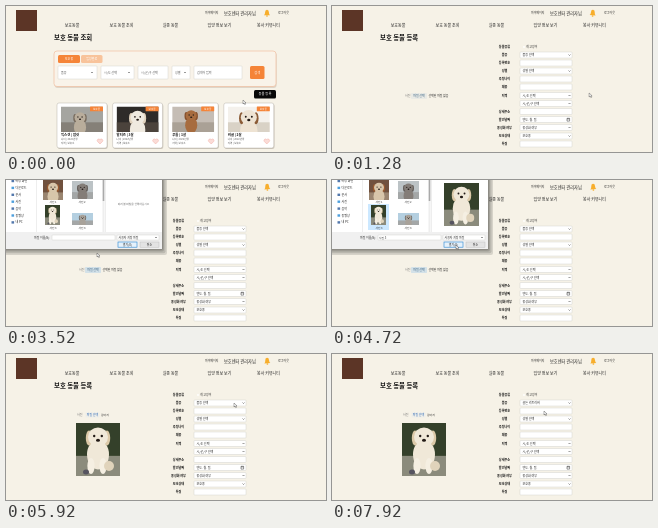
Animation of 320x146 px, one loop 8 s. Source, as an HTML page:

```html
<!DOCTYPE html>
<html>
<head>
<meta charset="utf-8">
<title>보호 동물 등록</title>
<style>
html, body { margin: 0; width: 100%; height: 100%; overflow: hidden; background: #f6f2e7; }
svg { display: block; }
#stage { width: 100%; height: 100%; }
text { font-family: "Noto Sans CJK KR", "Noto Sans CJK", "Noto Sans", sans-serif; }
</style>
</head>
<body>
<svg id="stage" viewBox="0 0 320 146"></svg>
<script>
const LOOP = 8000;
const ORANGE = '#f58438';
const $ = id => document.getElementById(id);

// Text is placed by its vertical centre.
const text = (x, y, s, size = 3, fill = '#222', more = '') =>
  `<text x="${x}" y="${y + size * .36}" font-size="${size}" fill="${fill}" ${more}>${s}</text>`;
const mid = (x, y, s, size, fill, more = '') =>
  text(x, y, s, size, fill, 'text-anchor="middle" ' + more);
const BOLD = 'font-weight="700"';
const rect = (x, y, w, h, fill, more = '') =>
  `<rect x="${x}" y="${y}" width="${w}" height="${h}" fill="${fill}" ${more}/>`;
const oval = (x, y, rx, ry, fill) =>
  `<ellipse cx="${x}" cy="${y}" rx="${rx}" ry="${ry}" fill="${fill}"/>`;
const line = (d, color = '#555', w = .5) =>
  `<path d="${d}" fill="none" stroke="${color}" stroke-width="${w}"/>`;
const group = (id, body) => `<g id="${id}">${body}</g>`;
const field = (x, y, w, h = 6) => rect(x, y - h / 2, w, h, '#fff', 'rx=".7" stroke="#c9c9c4" stroke-width=".4"');
const arrow = (x, y) => line(`M${x - 1} ${y - .5}l1 1 1-1`, '#333');

function pet(x, y, w, h, { vw = w, vh = h, sky, floor, fur, ear, cx = vw / 2, cy = vh * .38, r = vh * .25, legs = '' }) {
  const ears = [-1, 1].map(s => oval(cx + s * r * .9, cy + r * .1, r * .32, r * .75, ear)).join('');
  const eyes = [-1, 1].map(s => oval(cx + s * r * .38, cy - r * .1, r * .12, r * .13, '#221a16')).join('');
  return `<svg x="${x}" y="${y}" width="${w}" height="${h}" viewBox="0 0 ${vw} ${vh}" preserveAspectRatio="none">` +
    rect(0, 0, vw, vh, sky) + rect(0, vh * .62, vw, vh, floor) +
    oval(cx, cy + r * 1.75, r * 1.1, r * 1.5, fur) + legs + ears +
    oval(cx, cy, r, r * .95, fur) + eyes + oval(cx, cy + r * .32, r * .2, r * .15, '#221a16') + '</svg>';
}

const puppy = (x, y, w, h) => pet(x, y, w, h, {
  vw: 44, vh: 53, sky: '#34402a', floor: '#8b8b7c', fur: '#f0e8d8', ear: '#dcc9a8', cx: 22, cy: 14, r: 10,
  legs: oval(15, 43, 3.6, 8, '#f5efe2') + oval(27, 43, 3.6, 8, '#f5efe2') +
    oval(33, 43, 5, 5, '#e0d3bb') + oval(10, 49, 3, 2.5, '#565460')
});

function header() {
  const nav = [[66, '보호동물'], [115.5, '보호 동물 조회'], [164.5, '실종 동물'], [213.5, '입양 정보 보기'], [262.5, '봉사 커뮤니티']];
  return rect(10, 4, 21, 21, '#5c3526') +
    text(199, 7, '마이페이지', 2.9) + text(218, 7, '보호센터 관리자님', 4.2) + text(272, 7, '로그아웃', 3) +
    group('bell', '<path d="M258 9.3q1.1-1 1.1-3a1.9 2.5 0 0 1 3.8 0q0 2 1.1 3z" fill="#f7ae2c"/>' + oval(261, 10, .9, .8, '#f7ae2c')) +
    nav.map(([x, s]) => mid(x, 20, s, 4, '#222', 'font-weight="500"')).join('');
}

function listPage() {
  const inputs = [[52, 39, '품종', 1], [95, 33, '시/도 선택', 1], [132, 30, '시/군/구 선택', 0], [166, 18, '성별', 1], [188, 48, '검색어 입력', 0]];
  const cards = [
    ['믹스견 | 암컷', { sky: '#a5a5a0', floor: '#858078', fur: '#b9ad9b', ear: '#766a5c', cx: 19, cy: 11, r: 5.5 }],
    ['말티즈 | 3살', { sky: '#2e2b29', floor: '#4b433c', fur: '#efeae0', ear: '#e0d2bd', cx: 21, cy: 11, r: 7 }],
    ['푸들 | 1살', { sky: '#c5bdb5', floor: '#aaa196', fur: '#a76c3f', ear: '#86502c', cx: 19, cy: 9, r: 5.5 }],
    ['비글 | 2살', { sky: '#f4f1ec', floor: '#d9d2c6', fur: '#eee3d3', ear: '#8b5b36', cx: 21, cy: 11, r: 8 }]
  ];
  return text(48, 31.5, '보호 동물 조회', 6.4, '#111', BOLD) +
    rect(48.6, 46, 222, 36, '#ded5c8', 'rx="3"') +
    rect(48, 45, 222, 35.5, '#f9f3e9', 'rx="3" stroke="#f0b795" stroke-width=".6"') +
    rect(52, 49, 22, 8, ORANGE, 'rx="1.5"') + mid(63, 53, '보호중', 3, '#fff') +
    rect(75, 49, 21.5, 8, '#f8c39b', 'rx="1.5"') + mid(85.7, 53, '입양완료', 3, '#fff') +
    inputs.map(([x, w, s, open]) => field(x, 66.5, w, 13) +
      text(x + 3, 66.5, s, 3, '#555') + (open ? arrow(x + w - 5, 66.5) : '')).join('') +
    rect(244, 60, 14.5, 13, ORANGE, 'rx="1.5"') + mid(251.2, 66.5, '검색', 3.2, '#fff') +
    rect(248, 84, 22, 8.5, '#080808', 'rx="1.5"') + mid(259, 88.2, '동물 등록', 3.3, '#fff') +
    cards.map(([name, look], i) => {
      const x = 51 + i * 55.6;
      return rect(x + .7, 98, 50, 45, '#d0c9bd', 'rx="2"') +
        rect(x, 97, 50, 45, '#fff', 'rx="2" stroke="#a9a49b" stroke-width=".4"') +
        pet(x + 4, 100.5, 42, 25.5, look) +
        rect(x + 33, 100.5, 13, 4.8, ORANGE, 'rx=".6"') + mid(x + 39.5, 102.9, '보호중', 2.6, '#fff') +
        text(x + 4, 128.5, name, 3.4, '#111', BOLD) +
        text(x + 4, 133, '나이 | 2022년생', 2.5, '#555') + text(x + 4, 137, '지역 | 보호소', 2.5, '#555') +
        `<path d="M${x + 43} 138l-2.5-2.5a1.5 1.5 0 0 1 2.5-1.9 1.5 1.5 0 0 1 2.5 1.9z" fill="#fbdcd7" stroke="#ec9c94" stroke-width=".4"/>`;
    }).join('');
}

function formPage() {
  // label, value, y, kind: r radio, s select, i input, d date
  const rows = [
    ['동물종류', '', 41, 'r'], ['품종', '', 49, 's'], ['등록번호', '', 57, 'i'], ['성별', '성별 선택', 65, 's'],
    ['추정나이', '', 73, 'i'], ['체중', '', 81, 'i'], ['지역', '시/도 선택', 89.5, 's'], ['', '시/군/구 선택', 97.5, 's'],
    ['상세주소', '', 105.5, 'i'], ['발견날짜', '연도. 월. 일.', 113.5, 'd'], ['중성화 여부', '중성화 여부', 121.5, 's'],
    ['보호상태', '보호중', 130, 's'], ['특징', '', 138, 'i']
  ];
  return text(48, 31.5, '보호 동물 등록', 6.4, '#111', BOLD) +
    rows.map(([label, value, y, kind]) => {
      const name = mid(172.5, y, label, 3.1, '#111', BOLD);
      if (kind == 'r') return name + oval(192, y, .9, .9, '#fff') + text(194, y, '개 고양이', 2.9);
      return name + field(188, y, 52) + text(190.5, y, value, 3) +
        (kind == 's' ? arrow(237.5, y) : '') +
        (kind == 'd' ? line(`M235 ${y - 1.2}h2.6v2.8h-2.6zm0 .6h2.6`, '#222', .45) : '');
    }).join('') +
    group('breed', text(190.5, 49, '품종 선택', 3)) +
    group('picked', text(190.5, 49, '골든 리트리버', 3)) +
    group('empty', text(73, 90, '사진', 3, '#777') +
      rect(79, 87, 16, 6, '#e9eae5', 'id="pick" rx=".7"') + mid(87, 90, '파일 선택', 3, '#345f80') +
      text(96.5, 90, '선택된 파일 없음', 2.9)) +
    group('photo', text(71, 61, '사진', 3, '#777') +
      rect(79.5, 58.5, 14, 5, '#eeeee9', 'rx=".7"') + mid(86.5, 61, '파일 선택', 2.9, '#2663b3') +
      text(95, 61, '강아지', 2.8) + puppy(70, 69, 44, 53));
}

function dialog() {
  const folders = ['바탕 화면', '다운로드', '문서', '사진', '음악', '동영상', '내 PC'];
  const grey = { sky: '#bcc3c6', floor: '#a4a7a7', fur: '#847d78', ear: '#645e5a' };
  return [5, 3.5, 2, 1].map(n => rect(-4, -4, 160 + n, 73 + n * 1.2, '#000', 'rx="2" opacity=".13"')).join('') +
    rect(0, 0, 156, 69, '#f0f0f0') + rect(0, 0, 156, 52, '#fff') +
    folders.map((s, i) => rect(5.5, 1 + i * 6.9 - 1.2, 2.6, 2.4, i % 2 ? '#4d9fdd' : '#5378ac') +
      text(9.5, 1 + i * 6.9, s, 3)).join('') +
    line('M30.5 0V52M99.5 0V52', '#ddd') + rect(96.5, 0, 2, 52, '#eee') + rect(96.7, 0, 1.6, 21, '#aaa') +
    group('mark', rect(36, 24, 21, 26, '#cce8ff')) +
    pet(37, 0, 20, 20, { sky: '#70513e', floor: '#9a8570', fur: '#d8c6aa', ear: '#98592f' }) +
    pet(66, 1, 21, 18, grey) + puppy(39, 25, 15, 20) +
    pet(66, 33, 21, 12, { ...grey, sky: '#b4cfe0', fur: '#a8a29a' }) +
    [[47, 22.3], [76, 22.3], [47, 48], [76, 48]].map(([x, y], i) => mid(x, y, '사진 ' + (i + 1), 2.7)).join('') +
    group('hint', mid(127.5, 24.5, '미리 볼 파일을 선택하십시오', 2.7, '#666')) +
    group('preview', puppy(112, 3, 35, 43)) +
    text(28, 57.5, '파일 이름(N):', 2.9) + field(46, 57.5, 63, 5) + group('file', text(47, 57.5, '사진 3', 2.8)) +
    field(111, 57.5, 42, 5) + text(112.5, 57.5, '사용자 지정 파일', 2.9) + arrow(150, 57.5) +
    rect(112, 62, 19, 5.2, '#e5f1fb', 'stroke="#2786d3" stroke-width=".6"') + mid(121.5, 64.6, '열기(O)', 2.9) +
    rect(134, 62, 19, 5.2, '#e3e3e3', 'stroke="#b5b5b5" stroke-width=".4"') + mid(143.5, 64.6, '취소', 2.9);
}

const breeds = ['품종 선택', '진돗개', '말티즈', '푸들', '비글', '시바견', '골든 리트리버', '포메라니안', '치와와',
  '웰시코기', '불도그', '닥스훈트', '시츄', '보더콜리', '사모예드', '슈나우저', '믹스견'];
const ROW = 5.5;
const menu = () => rect(188, 52.2, 52, 95, '#fff', 'stroke="#888" stroke-width=".5"') +
  rect(188.2, 0, 51.6, ROW, '#1b6ad1', 'id="bar"') +
  breeds.map((s, i) => text(190.5, 55.2 + i * ROW, s, 3, '#222', 'class="breed"')).join('');

$('stage').innerHTML = rect(0, 0, 320, 146, '#f6f2e7') + header() + group('list', listPage()) +
  group('form', formPage()) + group('dialog', dialog()) + group('menu', menu()) +
  '<path id="cursor" d="M0 0v4l1-.9.7 1.5.7-.3-.7-1.4h1.3z" fill="#fff" stroke="#222" stroke-width=".35"/>';

// time, x, y
const path = [[0, 237, 94], [160, 237, 94], [560, 258, 87], [1500, 257, 87], [2500, 90, 90], [3120, 93, 90.5],
  [3240, 93, 90.5], [3480, 91, 73], [3560, 91, 73], [4000, 48, 38], [4240, 48, 38], [4640, 124, 65], [5240, 124, 65],
  [5840, 228, 49], [6160, 228, 49], [6960, 212, 88], [7280, 212, 88], [7760, 212, 57], [LOOP, 212, 57]];

function cursorAt(t) {
  const i = path.findIndex(p => p[0] > t);
  const [t0, x0, y0] = path[i - 1], [t1, x1, y1] = path[i];
  const u = (t - t0) / (t1 - t0), k = u * u * (3 - 2 * u);
  return [x0 + (x1 - x0) * k, y0 + (y1 - y0) * k];
}

const show = (id, on) => { $(id).style.display = on ? '' : 'none'; };

function draw(t) {
  const during = (a, b) => t >= a && t < b;
  const [x, y] = cursorAt(t);
  const chosen = t >= 4080, loaded = t >= 5200, picked = t >= 7200;
  show('list', t < 1200);
  show('form', t >= 1200);
  show('dialog', during(3200, 5200));
  show('mark', chosen);
  show('preview', chosen);
  show('file', chosen);
  show('hint', !chosen);
  show('empty', !loaded);
  show('photo', loaded);
  show('breed', !picked);
  show('picked', picked);
  show('menu', during(6080, 7200));
  $('pick').setAttribute('fill', t > 2440 ? '#d3e1e8' : '#e9eae5');
  const row = Math.max(0, Math.floor((y - 52.5) / ROW));
  $('bar').setAttribute('y', 52.5 + row * ROW);
  document.querySelectorAll('.breed').forEach((e, i) => e.setAttribute('fill', i == row ? '#fff' : '#222'));
  $('bell').setAttribute('transform', `rotate(${4 * Math.sin(t * Math.PI / 200)} 261 4)`);
  $('cursor').setAttribute('transform', `translate(${x} ${y})`);
}

const start = performance.now();
function tick() {
  draw((performance.now() - start) % LOOP);
  requestAnimationFrame(tick);
}
tick();
</script>
</body>
</html>
```
